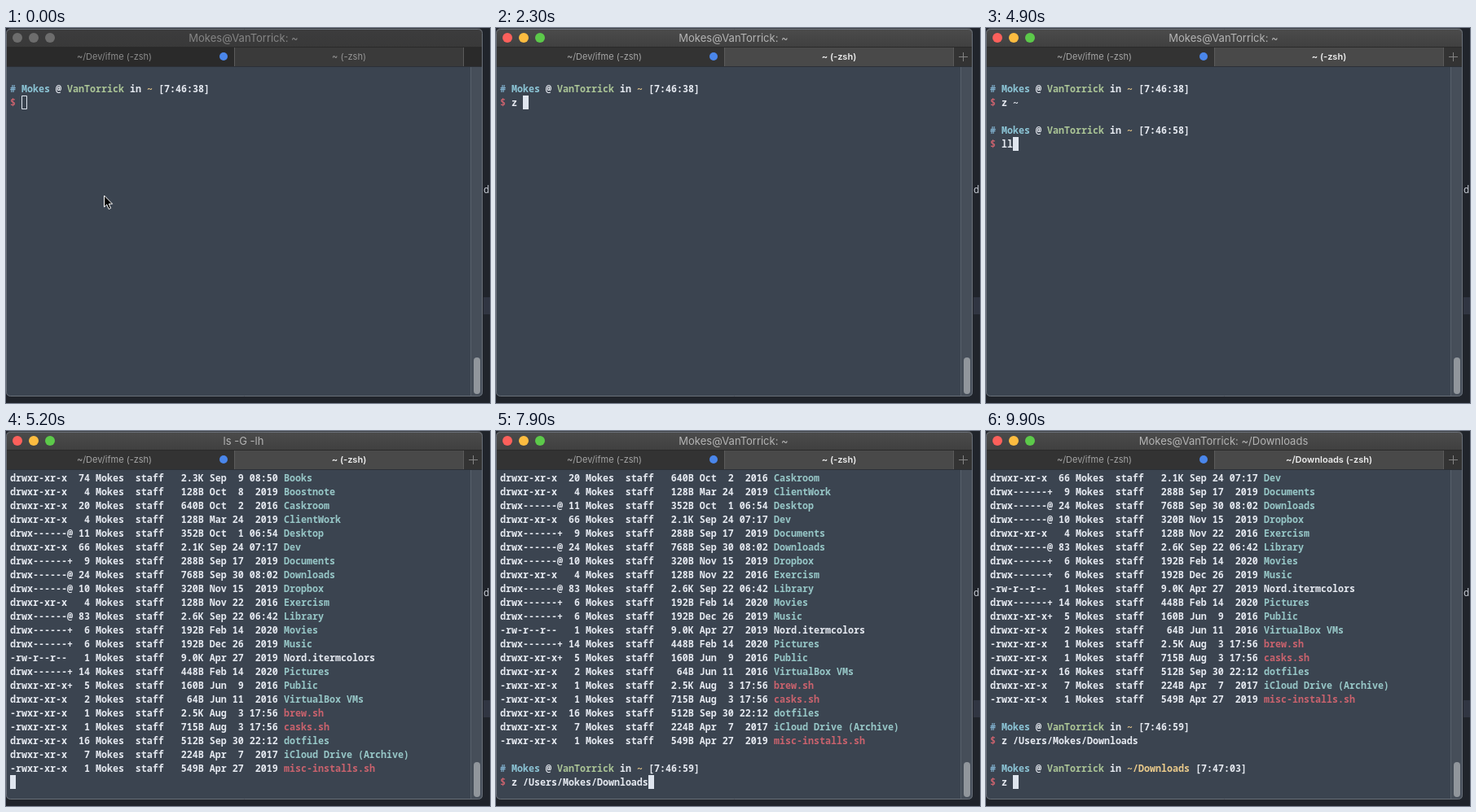
These frames come from a looping animation (594x461 px, 10 s). An HTML page with a canvas:

```html
<!DOCTYPE html>
<html lang="en">
<head>
<meta charset="utf-8">
<title>Terminal session</title>
<style>
html, body { margin: 0; width: 100%; height: 100%; overflow: hidden; background: #20242b; }
canvas { display: block; width: 594px; height: 461px; }
</style>
</head>
<body>
<canvas id="stage"></canvas>
<script>
const W = 594, H = 461, LOOP = 10000;
const ROWS = 23, CELL = 7, LINE = 17, LEFT = 5, TOP = 49;
const MONO = '"Noto Sans Mono", "DejaVu Sans Mono", monospace';
const SANS = 'Inter, Roboto, sans-serif';
const C = {
  bg: '#3b4450', text: '#e5e9f0', hash: '#81b1cf', user: '#8cc5d6', host: '#abc596',
  path: '#ebcb8b', red: '#c9626d', dir: '#97c7c7'
};
const USER = 'Mokes', HOST = 'VanTorrick';

const canvas = document.getElementById('stage');
const ctx = canvas.getContext('2d');
const dpr = window.devicePixelRatio || 1;
canvas.width = W * dpr;
canvas.height = H * dpr;

const FILES = `drwxr-xr-x 74 2.3K Sep 9 08:50 Books
drwxr-xr-x 4 128B Oct 8 2019 Boostnote
drwxr-xr-x 20 640B Oct 2 2016 Caskroom
drwxr-xr-x 4 128B Mar 24 2019 ClientWork
drwx------@ 11 352B Oct 1 06:54 Desktop
drwxr-xr-x 66 2.1K Sep 24 07:17 Dev
drwx------+ 9 288B Sep 17 2019 Documents
drwx------@ 24 768B Sep 30 08:02 Downloads
drwx------@ 10 320B Nov 15 2019 Dropbox
drwxr-xr-x 4 128B Nov 22 2016 Exercism
drwx------@ 83 2.6K Sep 22 06:42 Library
drwx------+ 6 192B Feb 14 2020 Movies
drwx------+ 6 192B Dec 26 2019 Music
-rw-r--r-- 1 9.0K Apr 27 2019 Nord.itermcolors
drwx------+ 14 448B Feb 14 2020 Pictures
drwxr-xr-x+ 5 160B Jun 9 2016 Public
drwxr-xr-x 2 64B Jun 11 2016 VirtualBox VMs
-rwxr-xr-x 1 2.5K Aug 3 17:56 brew.sh
-rwxr-xr-x 1 715B Aug 3 17:56 casks.sh
drwxr-xr-x 16 512B Sep 30 22:12 dotfiles
drwxr-xr-x 7 224B Apr 7 2017 iCloud Drive (Archive)
-rwxr-xr-x 1 549B Apr 27 2019 misc-installs.sh`.split('\n').map(fileLine);

function fileLine(row) {
  const [mode, links, size, month, day, when, ...name] = row.split(' ');
  const info = mode.padEnd(11) + links.padStart(3) + ` ${USER}  staff  ` + size.padStart(5) +
    ` ${month} ${day.padStart(2)} ${when.padStart(5)} `;
  const color = mode[0] === 'd' ? C.dir : mode[3] === 'x' ? C.red : C.text;
  return [[info, C.text], [name.join(' '), color]];
}

// Each event edits the terminal state; the state at t is the sum of all events up to t.
const type = text => s => { s.input = text; };
const enter = (title, output = []) => s => {
  s.lines.push(command(s.input), ...output);
  s.input = null;
  s.title = title;
};
const prompt = (path, clock) => s => {
  s.lines.push([], [['#', C.hash], [' ' + USER, C.user], [' @ ', C.text], [HOST, C.host],
    [' in ', C.text], [path, C.path, 700], [` [${clock}]`, C.text]]);
  s.input = '';
  s.title = `${USER}@${HOST}: ${path}`;
  s.tab = path;
};
const command = input => [['$ ', C.red], [input, C.text]];
const target = `/Users/${USER}/Downloads`;

const EVENTS = [
  [0, prompt('~', '7:46:38')],
  [600, s => { s.active = true; }],
  [1000, type('z')],
  [1400, type('z ')],
  [3000, type('z ~')],
  [3400, enter('_z ~ 2>&1')],
  [3600, prompt('~', '7:46:58')],
  [4500, type('l')],
  [4900, type('ll')],
  [5200, enter('ls -G -lh', FILES)],
  [5400, prompt('~', '7:46:59')],
  [6100, type('z')],
  [7000, type('z ')],
  [7400, type('z d')],
  [7500, type('z do')],
  [7600, type('z dow')],
  [7800, type('z ' + target)],
  [8300, enter(`_z ${target} 2>&1`)],
  [8400, s => { s.tab = 'z'; }],
  [8700, prompt('~/Downloads', '7:47:03')],
  [9300, type('z')],
  [9900, type('z ')]
];

function stateAt(t) {
  const s = { lines: [], input: '', title: '', tab: '', active: false };
  for (const [at, apply] of EVENTS) if (t >= at) apply(s);
  return s;
}

function rect(x, y, w, h, color) {
  ctx.fillStyle = color;
  ctx.fillRect(x, y, w, h);
}

function disc(x, y, r, color) {
  ctx.fillStyle = color;
  ctx.beginPath();
  ctx.arc(x, y, r, 0, Math.PI * 2);
  ctx.fill();
}

function label(text, x, y, font, color, align = 'center') {
  ctx.font = font;
  ctx.fillStyle = color;
  ctx.textAlign = align;
  ctx.fillText(text, x, y);
}

function drawDesktop() {
  rect(0, 0, W, H, '#20242b');
  rect(586, 331, 8, 21, '#303542');
  label('d', 586, 203, `12px ${MONO}`, '#c3c8d0', 'left');
}

function drawChrome(s) {
  const on = s.active;
  const bar = ctx.createLinearGradient(0, 1, 0, 24);
  bar.addColorStop(0, on ? '#4b4b4b' : '#3c3c3d');
  bar.addColorStop(1, on ? '#404040' : '#393939');
  rect(0, 0, 585, 24, bar);
  rect(0, 24, 585, 23, on ? '#333333' : '#2a2a2a');
  rect(281, 24, 280, 23, on ? '#494949' : '#3a3a3a');
  rect(0, 23, 585, 1, '#2a2a2a');
  rect(280, 24, 1, 23, '#5b5b5b');
  rect(561, 24, 1, 23, '#5b5b5b');
  rect(0, 47, 585, 1, '#2c3037');

  const lights = on ? ['#fc605b', '#fdbc40', '#5cc94a'] : ['#6d6d6d', '#6d6d6d', '#6d6d6d'];
  lights.forEach((color, i) => disc(14 + 20 * i, 12, 6, color));
  label(s.title, 291.5, 17, `13px ${SANS}`, on ? '#b4b4b4' : '#858585');
  label('~/Dev/ifme (-zsh)', 133, 39, `11px ${SANS}`, on ? '#a5a5a5' : '#8b8b8b');
  label(s.tab + ' (-zsh)', 421, 39, `${on ? 600 : 400} 11px ${SANS}`, on ? '#eeeeee' : '#969696');
  disc(267, 35, 5, '#4a86ea');
  if (on) {
    rect(568, 35, 11, 1, '#838383');
    rect(573, 30, 1, 11, '#838383');
  }
}

function drawScrollbar(s) {
  rect(570, 48, 1, 404, '#59616b');
  rect(571, 48, 14, 404, '#464e59');
  const top = s.lines.length > ROWS ? 407 : 405;
  ctx.fillStyle = '#91969c';
  ctx.beginPath();
  ctx.roundRect(574, top, 8, 450 - top, 4);
  ctx.fill();
}

function drawText(s) {
  const last = s.input === null ? [] : command(s.input);
  const rows = [[], ...s.lines.slice(1), last].slice(-ROWS);
  rows.forEach((line, r) => {
    let x = LEFT;
    for (const [text, color, weight = 600] of line) {
      label(text, x, TOP + LINE * r + 13, `${weight} 11.667px ${MONO}`, color, 'left');
      x += text.length * CELL;
    }
  });
  const col = s.input === null ? 0 : s.input.length + 2;
  const x = LEFT + CELL * col, y = TOP + LINE * (rows.length - 1);
  if (s.active) {
    rect(x, y, CELL, LINE, '#dfe5ee');
  } else {
    ctx.strokeStyle = '#dfe5ee';
    ctx.lineWidth = 1;
    ctx.strokeRect(x + 0.5, y + 0.5, CELL - 1, LINE - 1);
  }
}

function drawPointer(t) {
  if (t >= 1000) return;
  ctx.lineJoin = 'round';
  if (t < 600) {
    const p = new Path2D('M120.5 206v14l3.2-3 2.5 5.6 2.4-1.1-2.4-5.3h4.4z');
    ctx.fillStyle = '#000';
    ctx.fill(p);
    ctx.strokeStyle = '#fff';
    ctx.lineWidth = 1;
    ctx.stroke(p);
    return;
  }
  const beam = new Path2D('M118 201q3.5 0 3.5 2.5q0-2.5 3.5-2.5M121.5 203v11M119.5 210h4M118 216q3.5 0 3.5-2.5q0 2.5 3.5 2.5');
  for (const [width, color] of [[3, '#f2f2f2'], [1, '#111']]) {
    ctx.strokeStyle = color;
    ctx.lineWidth = width;
    ctx.stroke(beam);
  }
}

function draw(t) {
  const s = stateAt(t);
  ctx.setTransform(dpr, 0, 0, dpr, 0, 0);
  drawDesktop();
  ctx.save();
  ctx.beginPath();
  ctx.roundRect(0, 0.5, 585, 452.5, 5);
  ctx.clip();
  rect(0, 0, 585, 453, C.bg);
  drawChrome(s);
  drawScrollbar(s);
  drawText(s);
  ctx.restore();
  ctx.strokeStyle = '#6a7079';
  ctx.lineWidth = 1;
  ctx.beginPath();
  ctx.roundRect(0.5, 1.5, 584, 451, 5);
  ctx.stroke();
  drawPointer(t);
}

const start = performance.now();
function tick() {
  draw((performance.now() - start) % LOOP);
  requestAnimationFrame(tick);
}
tick();
</script>
</body>
</html>
```
